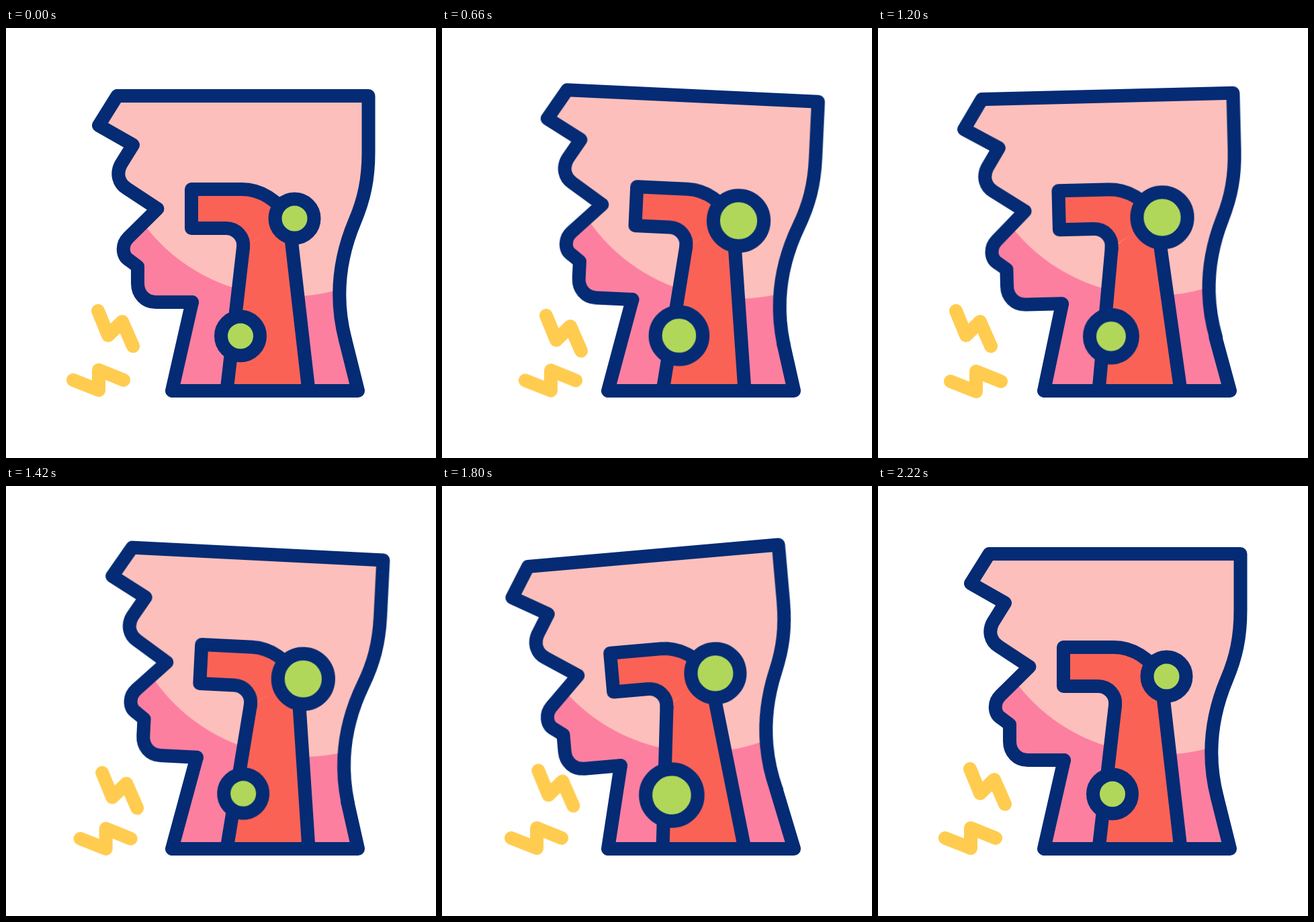
These frames come from a looping animation (640x640 px, 2.4 s). An HTML page without scripts:

```html
<!DOCTYPE html>
<html lang="en">
<head>
<meta charset="utf-8">
<title>Cough</title>
<style>
:root {
  --navy: #042b74;
  --pink: #fc7fa0;
  --light: #fdbfbb;
  --red: #fb6256;
  --green: #b1d75a;
  --yellow: #ffcc50;
  --ease: cubic-bezier(.33, 0, .67, 1);
}
html, body { margin: 0; width: 100%; height: 100%; overflow: hidden; background: #fff; }
svg { display: block; width: 100%; height: 100%; }

.line { fill: none; stroke: var(--navy); stroke-width: 20; stroke-linecap: round; stroke-linejoin: round; }
.skin { fill: var(--pink); stroke: var(--pink); stroke-width: 4; }
.flesh { fill: var(--red); stroke: var(--red); stroke-width: 4; }
.base { fill: var(--pink); }
.glow { fill: var(--light); }
.bolt { stroke: var(--yellow); }
.dot { fill: var(--yellow); }
.node { fill: var(--green); stroke: var(--navy); stroke-width: 20; r: 29px; }

.tilt, .neck, .tube, .node, .bolt { animation: 2400ms var(--ease) infinite; }
.dot { animation: spit 2400ms linear infinite; }

/* slow lean back, quick cough forward, twice */
.tilt { transform-origin: 364px 541px; animation-name: tilt; }
@keyframes tilt {
  0%, 10.83% { transform: rotate(0deg); }
  35.42%, 57.92% { transform: rotate(3.55deg); }
  41.83%, 66.25% { transform: rotate(-6.75deg); }
  92.5%, 100% { transform: rotate(0deg); }
}

/* the base stays put while the upper ends follow the head */
.neck { animation-name: neck; }
@keyframes neck {
  0%, 10.83% { d: path("M277 408L247 540L524 540L505 464"); }
  35.42%, 57.92% { d: path("M285.4 402.9L247 540L524 540L509.5 472.9"); }
  41.83%, 66.25% { d: path("M262 419.1L247 540L524 540L495 448"); }
  92.5%, 100% { d: path("M277 408L247 540L524 540L505 464"); }
}
.line.tube { fill: var(--red); animation-name: tube; }
@keyframes tube {
  0%, 10.83% { d: path("M353 327L328.5 540L450.5 540L421 283"); }
  35.42%, 57.92% { d: path("M366.3 326.7L328.5 540L450.5 540L436.9 287"); }
  41.83%, 66.25% { d: path("M327.9 329.8L328.5 540L450.5 540L390.3 278.1"); }
  92.5%, 100% { d: path("M353 327L328.5 540L450.5 540L421 283"); }
}

.upper { animation-name: upper; }
@keyframes upper {
  0%, 9.17% { r: 29px; }
  25%, 70% { r: 37.6px; }
  92.5%, 100% { r: 29px; }
}
.lower { animation-name: lower; }
@keyframes lower {
  0%, 9.17% { r: 29px; }
  40% { r: 38.8px; }
  55.8%, 66.67% { r: 29px; }
  75% { r: 38.8px; }
  92.5%, 100% { r: 29px; }
}

.high { animation-name: high; }
@keyframes high {
  0%, 9.17% { transform: translate(0, 0); }
  27.5% { transform: translate(18px, 7px); }
  40% { transform: translate(10px, 7px); }
  50% { transform: translate(-21px, 0); }
  66.67% { transform: translate(26px, 10px); }
  79%, 100% { transform: translate(0, 0); }
}
.low { animation-name: low; }
@keyframes low {
  0%, 9.17% { transform: translate(0, 0); }
  27.5% { transform: translate(24px, .5px); }
  40% { transform: translate(-9px, 5px); }
  50% { transform: translate(8px, 2px); }
  66.67% { transform: translate(12.5px, 0); }
  79%, 100% { transform: translate(0, 0); }
}

/* droplets wait behind the face and fly off to the left */
@keyframes spit {
  0%, 35% { translate: 0 0; }
  40% { translate: var(--near); }
  47.1% { translate: var(--far); }
  47.11%, 60% { translate: 0 0; }
  65% { translate: var(--near); }
  72.1% { translate: var(--far); }
  72.11%, 100% { translate: 0 0; }
}
</style>
</head>
<body>
<svg viewBox="0 0 640 640">
  <defs>
    <path id="head" d="M277 408H223C207 408 196 396 196 380V355L184 346C172 339 172 322 182 312L225.5 269L180 239C167 231 164 216 171 203L189 174L138 145L165.5 101H539.5V185C539.5 225 533 255 519 288C495 345 489 402 505 464"/>
    <path id="throat" d="M421 283C404 256 379 240 351 240H276V298H327C343 298 355 311 353 327"/>
    <clipPath id="face"><use href="#head"/></clipPath>
  </defs>

  <g>
    <circle class="dot" cx="260" cy="280" r="10.3" style="--near: -196px -7px; --far: -274px 1px"/>
    <circle class="dot" cx="260" cy="280" r="10.3" style="--near: -153.5px 14px; --far: -274px 61px"/>
    <circle class="dot" cx="260" cy="280" r="10.3" style="--near: -180.5px 53px; --far: -274px 116px"/>
  </g>

  <path class="line bolt high" d="M137 421L152 457.5L173 437L189 473.5"/>
  <path class="line bolt low" d="M100 524L138 539V509L175 524"/>

  <path class="base neck" d="M277 408L247 540L524 540L505 464"/>
  <g class="tilt">
    <path class="skin" d="M277 408L505 464L490 380L300 340Z"/>
    <use class="skin" href="#head"/>
    <path class="glow" clip-path="url(#face)" d="M100 60H560V361A270 270 0 0 1 200 285H100Z"/>
    <use class="line" href="#head"/>
  </g>
  <path class="line neck" d="M277 408L247 540L524 540L505 464"/>

  <path class="line tube" d="M353 327L328.5 540L450.5 540L421 283"/>
  <g class="tilt">
    <use class="flesh" href="#throat"/>
    <path class="flesh" d="M367 321L421 283L420 308L368 333Z"/>
    <use class="line" href="#throat"/>
    <circle class="node upper" cx="429.5" cy="283.5"/>
    <circle class="node lower" cx="349" cy="458.5"/>
  </g>
</svg>
</body>
</html>
```
